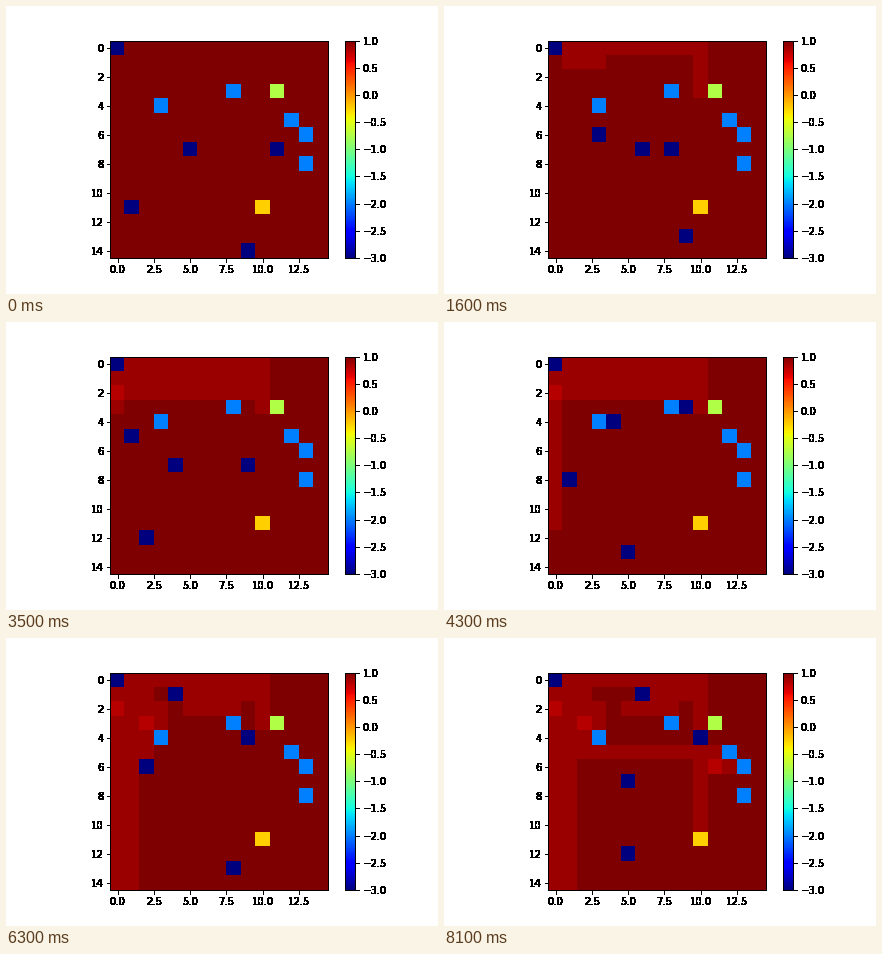
A matplotlib script that plays this animation: 432x288 px, repeating every 8200 ms.

```python
import matplotlib.pyplot as plt
import numpy as np
from matplotlib.animation import FuncAnimation

FRAMES, INTERVAL, SIZE = 82, 100, 15
FREE, VISIT_COST, OBSTACLE, HAZARD = 1.0, 0.1, -2.0, -3.0
START_VALUE, GOAL_VALUE = -0.75, -0.25
OBSTACLES = [(3, 4), (8, 3), (12, 5), (13, 6), (13, 8)]
START, HOME = (11, 3), (0, 0)

# Signed lengths of the explorer's legs, alternately across and down.
LEGS = [-1, -3, -9, 1, 8, 1, -9, -1, 0, 13, 1, -11, 2, 0, -1, 2, 9, 1, 1, 0,
        -2, 5]

# Cells each hazard passes on the shared beats.
BEATS = [0, 16, 28, 43, 54, 71, 81]
ROUTES = [
    [(1, 11), (3, 6), (1, 6), (1, 8), (2, 6), (3, 7), (5, 7)],
    [(5, 7), (6, 7), (4, 7), (4, 4), (4, 1), (6, 1), (6, 1)],
    [(11, 7), (8, 7), (9, 7), (9, 3), (9, 4), (11, 4), (10, 4)],
    [(9, 14), (9, 13), (1, 12), (5, 13), (9, 13), (5, 13), (5, 12)],
]
WINDUP = 1.5


def explorer_path():
    """One cell per frame along the legs."""
    cells = [np.array(START)]
    for i, leg in enumerate(LEGS):
        step = np.sign(leg) * np.eye(2, dtype=int)[i % 2]
        for _ in range(abs(leg)):
            cells.append(cells[-1] + step)
    return cells


def hazard_cell(route, frame):
    """Move from beat to beat, first backing off a little."""
    leg = min(np.searchsorted(BEATS, frame, side="right"), len(BEATS) - 1) - 1
    phase = (frame - BEATS[leg]) / (BEATS[leg + 1] - BEATS[leg])
    origin = np.array(route[leg])
    delta = np.array(route[leg + 1]) - origin
    heading = delta / max(np.abs(delta).sum(), 1)
    spot = origin + delta * phase - heading * WINDUP * np.sin(np.pi * phase)
    return np.clip(np.rint(spot), 0, SIZE - 1).astype(int)


def build_grids():
    path = explorer_path()
    ground = np.full((SIZE, SIZE), FREE)
    fixed = {cell: OBSTACLE for cell in OBSTACLES}
    fixed.update({START: START_VALUE, tuple(path[-1]): GOAL_VALUE,
                  HOME: HAZARD})
    grids = []
    for frame in range(FRAMES):
        if frame:
            x, y = path[frame]
            ground[y, x] -= VISIT_COST
        grid = ground.copy()
        for (x, y), value in fixed.items():
            grid[y, x] = value
        for route in ROUTES:
            x, y = hazard_cell(route, frame)
            grid[y, x] = HAZARD
            ground[y, x] = FREE  # a hazard wipes the trail it crosses
        grids.append(grid)
    return grids


def solid_ink(pixels, dpi):
    """Make every touched pixel fully opaque."""
    inked = pixels.copy()
    inked[..., 3] = np.ceil(inked[..., 3])
    return inked, 0, 0


plt.rcParams.update({"font.family": "DejaVu Sans", "font.size": 10})
fig, ax = plt.subplots(figsize=(6, 4), dpi=72, facecolor="white")
fig.subplots_adjust(left=0.125, right=0.9, bottom=0.125, top=0.88)

grids = build_grids()
image = ax.imshow(grids[0], cmap="jet", vmin=HAZARD, vmax=FREE,
                  interpolation="nearest")
ax.set_xticks(np.arange(0, SIZE, 2.5))
ax.set_yticks(range(0, SIZE, 2))
bar = fig.colorbar(image, ax=ax, ticks=np.arange(-3, 1.5, 0.5))

for part in (ax.xaxis, ax.yaxis, bar.ax.yaxis, bar.outline,
             *ax.spines.values()):
    part.set_agg_filter(solid_ink)


def update(frame):
    image.set_data(grids[frame])
    return [image]


anim = FuncAnimation(fig, update, frames=FRAMES, interval=INTERVAL,
                     repeat=True, repeat_delay=0, blit=False)
plt.show()
```
